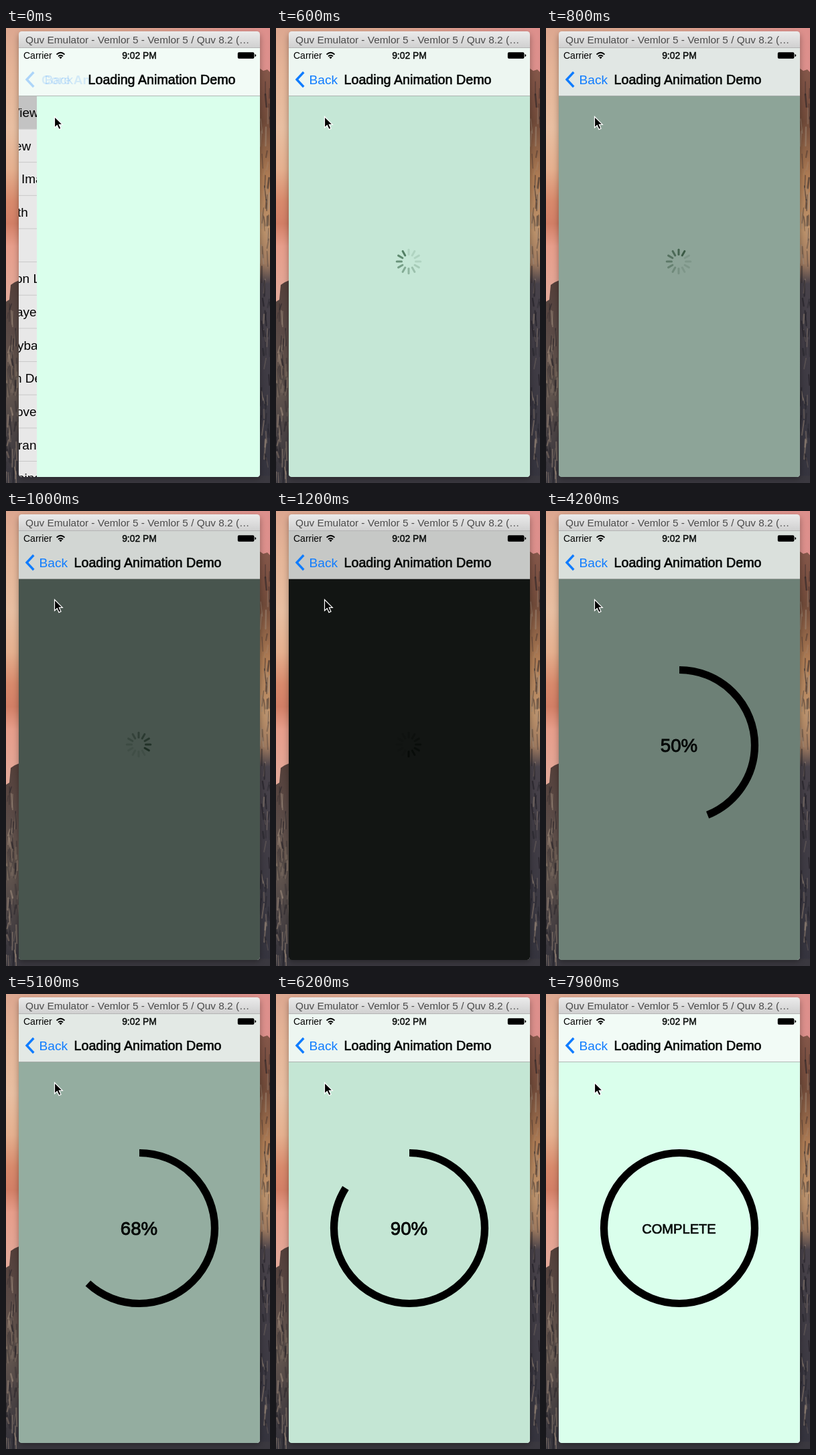
These frames come from a looping animation (394x680 px, 8.2 s). An HTML page:

```html
<!DOCTYPE html>
<html lang="en">
<head>
<meta charset="utf-8">
<title>Loading Animation Demo</title>
<style>
  html, body { margin: 0; width: 100%; height: 100%; overflow: hidden; background: #3a373c; }
  svg { display: block; width: 394px; height: 680px; }
  text { font-family: "Liberation Sans", Arial, sans-serif; }
  .medium { stroke: #050807; stroke-width: .032em; fill: #050807; text-anchor: middle; }
  .blue { fill: #0f7cff; }
</style>
</head>
<body>
<svg viewBox="0 0 394 680">
  <defs>
    <linearGradient id="sky" x2="0" y2="1">
      <stop offset="0" stop-color="#dca790"/>
      <stop offset=".1" stop-color="#e5b598"/>
      <stop offset=".22" stop-color="#e8bfa2"/>
      <stop offset=".31" stop-color="#e5b08f"/>
      <stop offset=".38" stop-color="#d88a6c"/>
      <stop offset=".43" stop-color="#d27f66"/>
      <stop offset=".48" stop-color="#e79e8b"/>
      <stop offset=".58" stop-color="#e3a898"/>
    </linearGradient>
    <linearGradient id="rose">
      <stop offset="0" stop-color="#dd8f8c" stop-opacity="0"/>
      <stop offset="1" stop-color="#dd8f8c"/>
    </linearGradient>
    <linearGradient id="rockL" x2="0" y2="1">
      <stop offset="0" stop-color="#54403a"/>
      <stop offset=".25" stop-color="#5a4a46"/>
      <stop offset=".5" stop-color="#665850"/>
      <stop offset="1" stop-color="#33323b"/>
    </linearGradient>
    <linearGradient id="rockR" x2="0" y2="1">
      <stop offset="0" stop-color="#85574a"/>
      <stop offset=".13" stop-color="#714b3a"/>
      <stop offset=".26" stop-color="#ad7b54"/>
      <stop offset=".39" stop-color="#bf946c"/>
      <stop offset=".47" stop-color="#a07b60"/>
      <stop offset=".52" stop-color="#48424a"/>
      <stop offset="1" stop-color="#35343e"/>
    </linearGradient>
    <linearGradient id="bar" x2="0" y2="1">
      <stop offset="0" stop-color="#ebebeb"/>
      <stop offset="1" stop-color="#d0d0d0"/>
    </linearGradient>
    <filter id="blur" x="-20%" y="-20%" width="140%" height="140%"><feGaussianBlur stdDeviation="5"/></filter>
    <clipPath id="win"><rect x="19" y="5" width="360" height="666" rx="4.5"/></clipPath>
  </defs>

  <rect width="394" height="680" fill="url(#sky)"/>
  <rect x="150" width="244" height="100" fill="url(#rose)"/>
  <path d="M0 409L5 406L7 384L13 380L20 377V680H0Z" fill="url(#rockL)"/>
  <path d="M378 60L384 64L390 62L394 66V680H378Z" fill="url(#rockR)"/>
  <path d="M0 669H394V680H0Z" fill="#3a383f"/>
  <g id="cracks" fill="none" stroke-linecap="round"/>
  <rect x="19" y="9" width="360" height="664" rx="5" opacity=".35" filter="url(#blur)"/>

  <g clip-path="url(#win)">
    <rect x="19" y="101" width="360" height="570" fill="#e8e8e8"/>
    <g id="table" font-size="19"></g>
    <rect id="page" x="19" y="101" width="360" height="570"/>
    <g id="spinner" stroke-width="3" stroke-linecap="round"></g>
    <circle id="arc" cx="199" cy="350" r="112.5" fill="none" stroke="#000" stroke-width="11.2"
      pathLength="100" transform="rotate(-90 199 350)"/>
    <text id="label" class="medium" x="198.5"></text>

    <rect id="nav" x="19" y="29" width="360" height="73"/>
    <rect x="19" y="101" width="360" height="1" opacity=".27"/>
    <text id="old" class="blue" y="83.5" font-size="19" font-weight="bold">Core An</text>
    <path id="chevron" d="M41.3 66L31 77L41.3 88" fill="none" stroke="#0f7cff" stroke-width="3.4"/>
    <text id="back" class="blue" y="83.5" font-size="19.2">Back</text>
    <text id="title" class="medium" y="83.5" font-size="19.7">Loading Animation Demo</text>

    <text x="26" y="46" font-size="14">Carrier</text>
    <path d="M75.5 39.6Q81.5 33.8 87.5 39.6M78 42.4Q81.5 39 85 42.4" fill="none" stroke="#000" stroke-width="2"/>
    <path d="M79.3 43.8Q81.5 41.9 83.7 43.8L81.5 46.3Z"/>
    <text class="medium" x="199" y="46" font-size="13.9">9:02 PM</text>
    <rect x="345.8" y="36.2" width="24.6" height="9.6" rx="1.8"/>
    <path d="M371.4 39Q373.4 39.5 373.4 41T371.4 43Z"/>

    <rect x="19" y="5" width="360" height="24.5" fill="url(#bar)"/>
    <rect x="19" y="29" width="360" height="1" fill="#b4b4b4"/>
    <text x="29" y="23" font-size="15.4" fill="#4b4b4b">Quv Emulator - Vemlor 5 - Vemlor 5 / Quv 8.2 (…</text>
  </g>

  <path d="M72.5 132.5V149L76.3 145.5L79 151.6L82 150.3L79.3 144.3H84.3Z"
    fill="#000" stroke="#fff" stroke-width="1.2"/>
</svg>
<script>
  const LOOP = 8200, STEP = 100, ARMS = 12;
  const $ = id => document.getElementById(id);
  const clamp = (v, lo, hi) => Math.min(hi, Math.max(lo, v));
  const rgb = parts => `rgb(${parts.map(Math.round)})`;
  const set = (el, attrs) => {
    for (const k in attrs) el.setAttribute(k, attrs[k]);
    return el;
  };
  const add = (parent, tag, attrs) =>
    parent.appendChild(set(document.createElementNS('http://www.w3.org/2000/svg', tag), attrs));

  // Rock texture beside the window
  let seed = 11;
  const rnd = () => (seed = (seed * 16807) % 2147483647) / 2147483647;
  for (let i = 0; i < 150; i++) {
    const left = i % 2, x = left ? rnd() * 19 : 380 + rnd() * 14;
    const y = left ? 412 + rnd() * 255 : 80 + rnd() * 580;
    add($('cracks'), 'path', {
      d: `M${x} ${y}l${rnd() * 6 - 3} ${8 + rnd() * 20}`,
      stroke: rnd() < .6 ? '#1f1d24' : '#a5917f',
      'stroke-width': .8 + rnd() * 2,
      opacity: .2 + rnd() * .4
    });
  }

  // Remains of the list sliding out on the left
  const rows = [['View', 8], ['ew', 13], ['Image', 23], ['th', 17], ['', 0], ['on L', 14],
    ['ayer', 15], ['yback', 17], ['n De', 13], ['over', 15], ['ran', 18], ['ping', 17]];
  rows.forEach(([name, x], i) => {
    const y = 101.5 + i * 49.65;
    if (!i) add($('table'), 'rect', { x: 0, y, width: 60, height: 49.65, fill: '#c3c3c3' });
    add($('table'), 'rect', { x: 0, y: y + 49, width: 60, height: 1, fill: '#c9c9c9' });
    add($('table'), 'text', { x, y: y + 31.5 }).textContent = name;
  });

  const arms = Array.from({ length: ARMS }, (_, i) => add($('spinner'), 'path', {
    d: 'M0 -10.5V-17.8', transform: `translate(198 349) rotate(${i * 30})`
  }));

  const progressAt = t => clamp((t - 1704.5) * .02004, 0, 106.12);

  function lightAt(t, percent) {
    if (t >= 1700) return percent / 100;
    const x = clamp((t - 420) / 945, 0, 1);
    return 1 - x * x * (3 - 2 * x);
  }

  function drawPush(t) {
    const k = t < 500 ? Math.exp(-t / 110) : 0;
    set($('page'), { x: 19 + 27 * k });
    set($('table'), { transform: `translate(${8 * (k - 1)} 0)` });
    set($('title'), { x: 211.5 + 21 * k });
    set($('back'), { x: 49.5 + 8 * k, opacity: 1 - .82 * k });
    set($('chevron'), { opacity: 1 - .7 * k });
    set($('old'), { x: 43 + 10 * k, opacity: .13 * k });
  }

  function drawSpinner(t, light) {
    set($('spinner'), {
      visibility: t >= 400 && t < 1700 ? 'visible' : 'hidden',
      stroke: rgb([60 * light, 112 * light, 78 * light])
    });
    const head = Math.floor((t - 400) / 1000 * ARMS) + 9;
    arms.forEach((arm, i) => {
      const age = ((head - i) % ARMS + ARMS) % ARMS;
      set(arm, { opacity: Math.max(.14, .8 - age * .085) });
    });
  }

  function draw(t) {
    const p = progressAt(t), percent = Math.min(100, Math.floor(p));
    const light = lightAt(t, percent), done = percent === 100;
    drawPush(t);
    drawSpinner(t, light);
    set($('page'), { fill: rgb([218 * light, 255 * light, 236 * light]) });
    set($('nav'), { fill: rgb([194 + 48 * light, 196 + 55 * light, 194 + 52 * light]) });
    const arc = clamp(p - 6.12, 0, 100);
    set($('arc'), {
      'stroke-dasharray': arc < 100 ? `${arc} 200` : 'none',
      visibility: arc > 0 ? 'visible' : 'hidden'
    });
    set($('label'), { y: done ? 357.5 : 360, 'font-size': done ? 20.1 : 27.7 });
    $('label').textContent = t < 1700 ? '' : done ? 'COMPLETE' : percent + '%';
  }

  const start = performance.now();
  function tick(now) {
    const t = Math.max(0, now - start) % LOOP;
    draw(Math.min(7900, Math.floor(t / STEP) * STEP));
    requestAnimationFrame(tick);
  }
  draw(0);
  requestAnimationFrame(tick);
</script>
</body>
</html>
```
